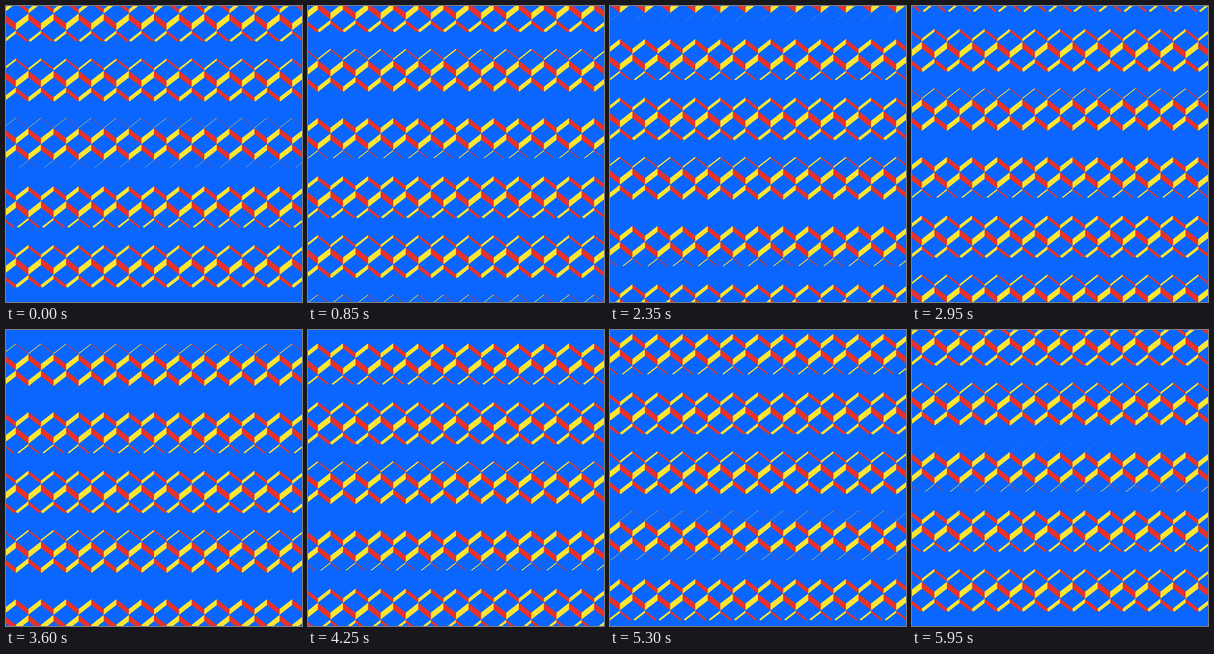
These frames come from a looping animation (500x500 px, 6 s). An HTML page with a canvas:

```html
<!DOCTYPE html>
<html lang="en">
<head>
<meta charset="utf-8">
<title>Wave of blocks</title>
<style>
  html, body { margin: 0; width: 100%; height: 100%; overflow: hidden; background: #0a66ff; }
  canvas { display: block; }
</style>
</head>
<body>
<canvas id="stage" width="500" height="500"></canvas>
<script>
const ctx = document.getElementById('stage').getContext('2d');
const BLUE = '#0a66ff', YELLOW = '#ffe632', RED = '#e6322d';
const LOOP = 6000, STEP = 50, MID = 250;

// A grid of 30px blocks turned 45 degrees and tilted towards the viewer
const TILT = Math.PI / 3.5;
const W = 15 * Math.SQRT2;          // half width of a block top
const D = W * Math.sin(TILT);       // half height of a block top
const AMP = 20 * Math.cos(TILT);    // wave height on screen
const ROWS = 19, COLS = 13;

function fill(color, trace) {
  ctx.fillStyle = color;
  ctx.beginPath();
  trace();
  ctx.fill();
}

function shape(...points) {
  points.forEach(([x, y], i) => i ? ctx.lineTo(x, y) : ctx.moveTo(x, y));
  ctx.closePath();
}

function drawRow(row, phase) {
  const lift = r => AMP * Math.sin(r + 23 + phase);
  const y = MID + row * D - lift(row);
  const drop = lift(row) - lift(row + 1);   // visible height of the side faces
  const centers = [];
  for (let c = -COLS; c <= COLS; c++) {
    if ((c + row) % 2) centers.push(MID + c * W);
  }
  const side = (color, dir) => fill(color, () => {
    for (const x of centers) {
      const edge = x + dir * W;
      shape([edge, y], [x, y + D], [x, y + D + drop], [edge, y + drop]);
    }
  });

  fill(BLUE, () => {
    for (const x of centers) shape([x - W, y], [x, y - D], [x + W, y], [x, y + D]);
  });
  if (drop > 0) {
    side(RED, -1);
    side(YELLOW, 1);
  }
}

function draw(ms) {
  const t = Math.floor(ms % LOOP / STEP) * STEP;
  const phase = 2 * Math.PI * t / LOOP;
  ctx.fillStyle = BLUE;
  ctx.fillRect(0, 0, 500, 500);
  for (let row = -ROWS; row <= ROWS; row++) drawRow(row, phase);
}

const start = performance.now();
function tick() {
  draw(performance.now() - start);
  requestAnimationFrame(tick);
}
tick();
</script>
</body>
</html>
```
